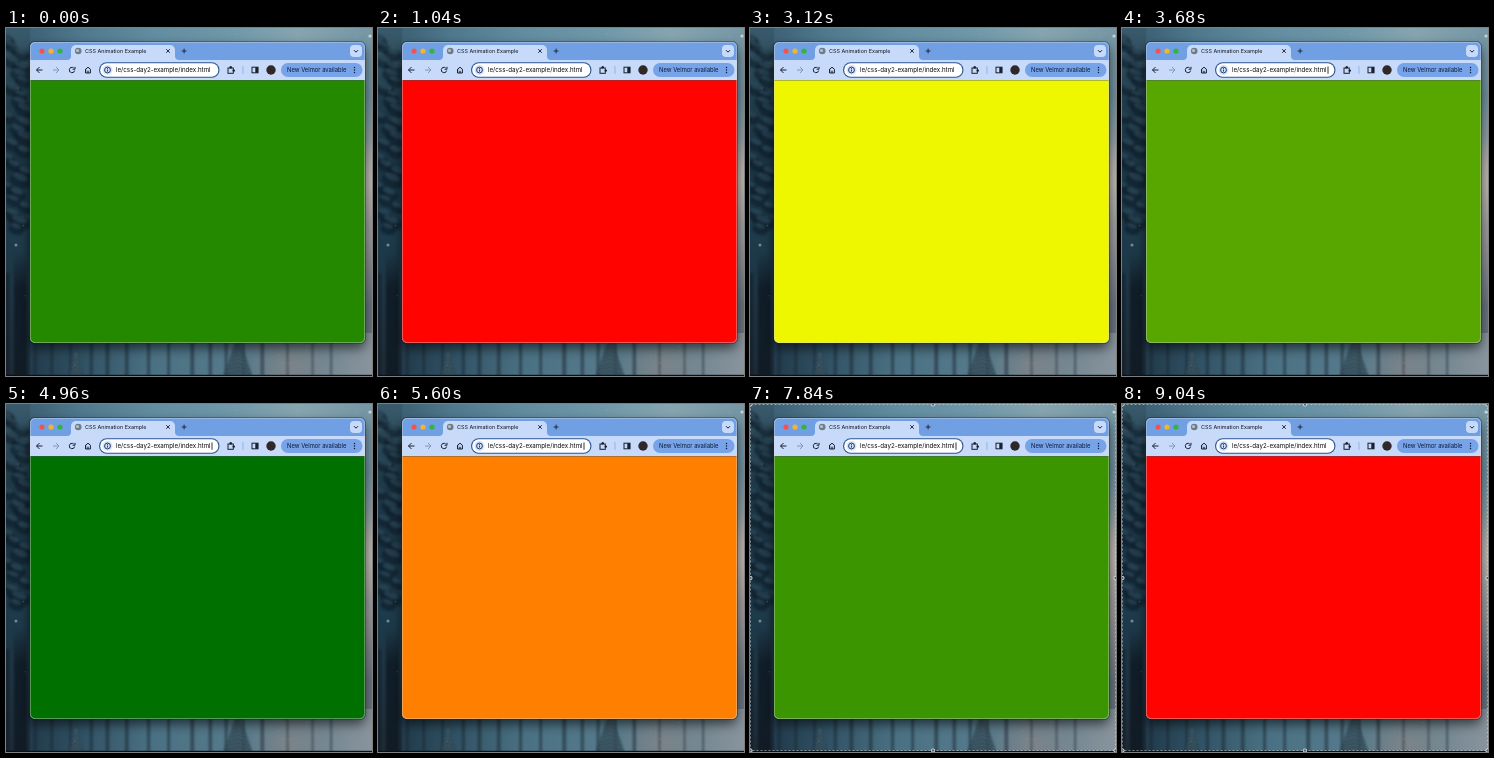
Animation of 366 by 348 pixels, one loop 9.12 s. Source, as an HTML page with a canvas:

```html
<!DOCTYPE html>
<html lang="en">
<head>
<meta charset="utf-8">
<title>CSS Animation Example</title>
<style>
html, body { margin: 0; width: 100%; height: 100%; overflow: hidden; background: #16242f; }
canvas { display: block; width: 366px; height: 348px; }
</style>
</head>
<body>
<canvas id="stage"></canvas>
<script>
const W = 366, H = 348, LOOP = 9120, STEP = 80;
const FONT = 'Inter, Roboto, sans-serif';
const INK = '#18202f', STRIP = '#719fe3', BAR = '#c7dafa';
const scale = window.devicePixelRatio || 1;

function setup(canvas) {
  canvas.width = W * scale;
  canvas.height = H * scale;
  const c = canvas.getContext('2d');
  c.scale(scale, scale);
  return c;
}

const ctx = setup(document.getElementById('stage'));
const scene = document.createElement('canvas');
let g = setup(scene);

let seed = 7;
function rand(a = 0, b = 1) {
  seed = (seed * 16807) % 2147483647;
  return a + (b - a) * seed / 2147483647;
}

function rect(x, y, w, h, color) {
  g.fillStyle = color;
  g.fillRect(x, y, w, h);
}

function round(x, y, w, h, r, color) {
  g.fillStyle = color;
  g.beginPath();
  g.roundRect(x, y, w, h, r);
  g.fill();
}

function disc(x, y, r, color) {
  g.fillStyle = color;
  g.beginPath();
  g.arc(x, y, r, 0, 7);
  g.fill();
}

function oval(x, y, rx, ry, tilt, color) {
  g.fillStyle = color;
  g.beginPath();
  g.ellipse(x, y, rx, ry, tilt, 0, 7);
  g.fill();
}

function line(points, color = INK, width = 1) {
  g.strokeStyle = color;
  g.lineWidth = width;
  g.beginPath();
  points.forEach(([x, y], i) => i ? g.lineTo(x, y) : g.moveTo(x, y));
  g.stroke();
}

function text(str, x, y, size, color) {
  g.font = `${size}px ${FONT}`;
  g.fillStyle = color;
  g.textBaseline = 'middle';
  g.fillText(str, x, y);
}

function gradient(x0, y0, x1, y1, ...colors) {
  const fill = g.createLinearGradient(x0, y0, x1, y1);
  colors.forEach((color, i) => fill.addColorStop(i / (colors.length - 1), color));
  return fill;
}

function glow(x, y, r, rgb, alpha) {
  const fill = g.createRadialGradient(x, y, 0, x, y, r);
  fill.addColorStop(0, `rgba(${rgb},${alpha})`);
  fill.addColorStop(1, `rgba(${rgb},0)`);
  rect(x - r, y - r, 2 * r, 2 * r, fill);
}

function bough(x, y, w) {
  oval(x, y + 3, w, w * 0.6, 0.3, 'rgba(13,29,40,0.6)');
  oval(x, y - 1, w * 0.7, w * 0.3, 0.35, 'rgba(66,100,120,0.4)');
}

function pine(x, top, bottom, half) {
  g.fillStyle = 'rgba(38,60,72,0.75)';
  g.beginPath();
  g.moveTo(x, top);
  g.lineTo(x + half, bottom);
  g.lineTo(x - half, bottom);
  g.fill();
  for (let y = top + 4; y < bottom; y += 4) {
    const w = half * (y - top) / (bottom - top);
    line([[x - w, y + 2], [x, y - 1], [x + w, y + 2]], 'rgba(150,172,182,0.35)', 1.2);
  }
}

function drawForest() {
  // top edge and right margin
  rect(0, 0, W, 20, gradient(0, 0, W, 0, '#35566a', '#4f788d', '#628da0', '#6e97a8', '#86a5b0', '#7596a5'));
  rect(355, 0, 11, H, gradient(0, 0, 0, H, '#7898a6', '#6d8f9e', '#a7a9a6', '#9b9a9c', '#68737f', '#6c7884'));
  glow(366, 155, 45, '215,200,188', 0.5);

  // lower edge, brighter towards the right
  rect(0, 305, W, 43, gradient(0, 0, W, 0, '#1b3040', '#2f5062', '#4a7183', '#54798a', '#67808c', '#89949d'));
  glow(282, 340, 40, '170,140,132', 0.35);
  rect(0, 0, 24, H, gradient(0, 0, 0, H, '#3a5b6d', '#203b4a', '#1b3443', '#1d3b4b', '#1e323f', '#1d2a35'));

  g.filter = `blur(${0.9 * scale}px)`;
  for (let i = 0; i < 28; i++) bough(rand(-2, 21), 10 + i * 7, rand(7, 12));
  for (let x = 28; x < W - 40; x += rand(12, 28)) {
    rect(x, 300, rand(1.5, 4), 48, 'rgba(24,34,44,0.5)');
  }
  rect(8, 225, 13, 125, gradient(0, 225, 0, 260, 'rgba(13,23,32,0)', 'rgba(13,23,32,0.75)'));
  rect(0, 245, 3, 105, 'rgba(13,23,32,0.5)');
  pine(232, 306, 350, 15);
  pine(70, 322, 350, 8);
  g.filter = 'none';

  for (let i = 0; i < 130; i++) {
    disc(rand(0, W), rand(0, H), rand(0.2, 0.75), `rgba(205,218,224,${rand(0.1, 0.4)})`);
  }
  disc(10, 217, 1.6, 'rgba(140,170,184,0.7)');
  disc(364, 8, 1.6, 'rgba(220,232,236,0.75)');
}

function drawTabs() {
  rect(24, 14, 335, 19, STRIP);
  // flared feet on both sides of the tab
  rect(61, 28, 112, 5, BAR);
  round(40, 20, 25, 12, 4, STRIP);
  round(169, 20, 25, 12, 4, STRIP);
  round(65, 17, 104, 22, 5, BAR);
  rect(24, 32, 335, 21, BAR);
  ['#f4524c', '#f3b52e', '#35b43c'].forEach((color, i) => disc(36 + i * 9, 23, 2.6, color));

  disc(72.2, 23, 3.3, '#6d7c87');
  disc(71.5, 22.4, 1.5, '#b7c3c8');
  text('CSS Animation Example', 79, 23.2, 5.45, '#0d131e');
  line([[160.2, 21.2], [163.8, 24.8]], INK, 0.9);
  line([[163.8, 21.2], [160.2, 24.8]], INK, 0.9);
  line([[175.7, 23], [180.5, 23]], INK, 0.9);
  line([[178.1, 20.6], [178.1, 25.4]], INK, 0.9);
  round(344, 17, 12, 12, 4, BAR);
  line([[348, 22.2], [350, 24.2], [352, 22.2]], INK, 1);
}

function arrow(x, dir, color) {
  line([[x - 3 * dir, 42], [x + 3 * dir, 42]], color);
  line([[x, 39], [x - 3 * dir, 42], [x, 45]], color);
}

function drawToolbar() {
  arrow(33.5, 1, INK);
  arrow(50, -1, '#8497b8');

  g.strokeStyle = INK;
  g.lineWidth = 1;
  g.beginPath();
  g.arc(66, 42, 2.7, 0.2, 5.4);
  g.stroke();
  line([[69, 38.8], [69, 41.2], [66.6, 41.2]]);
  line([[79.6, 41.2], [79.6, 45], [84.4, 45], [84.4, 41.2], [82, 39.2], [79.6, 41.2], [79.6, 45]]);
  rect(81.4, 42.8, 1.2, 2.2, INK);

  round(93, 34.2, 120.5, 15.6, 7.8, '#2c568f');
  round(94.1, 35.3, 118.3, 13.4, 6.7, '#ffffff');
  disc(101.5, 42, 5, '#d5e2fa');
  g.strokeStyle = '#1f3f70';
  g.lineWidth = 1;
  g.beginPath();
  g.arc(101.5, 42, 2.9, 0, 7);
  g.stroke();
  rect(101, 41.6, 1, 2, '#1f3f70');
  rect(101, 40, 1, 0.9, '#1f3f70');
  text('le/css-day2-example/index.html', 110, 42.2, 6.2, '#08090c');

  g.strokeStyle = INK;
  g.lineWidth = 1;
  g.strokeRect(222, 40, 5.3, 5.3);
  disc(224.7, 39.3, 1.2, INK);
  disc(227.8, 42.6, 1.2, INK);
  rect(236.5, 38, 0.9, 8, '#8eafe5');
  g.strokeStyle = INK;
  g.strokeRect(246, 39.2, 6, 5.6);
  rect(249.3, 39.2, 2.8, 5.6, INK);
  disc(265, 42, 4.7, '#302728');

  round(275, 35, 81.5, 14, 7, '#77a3e9');
  text('New Velmor available', 281, 42.2, 5.85, '#0b1a36');
  [39.6, 42, 44.4].forEach(y => disc(348.5, y, 0.75, '#0b1a36'));
}

function drawScene() {
  drawForest();
  g.save();
  g.shadowColor = 'rgba(0,0,0,0.6)';
  g.shadowBlur = 12 * scale;
  g.shadowOffsetY = 5 * scale;
  round(24, 14, 335, 301, 5, BAR);
  g.restore();
  g.save();
  g.beginPath();
  g.roundRect(24, 14, 335, 301, 5);
  g.clip();
  drawTabs();
  drawToolbar();
  g.restore();
  rect(0, 346.8, W, 1.2, '#0b1016');
}

// The standard "ease" curve: cubic-bezier(.25, .1, .25, 1)
function ease(x) {
  const bezier = (a, b, s) => 3 * a * s * (1 - s) ** 2 + 3 * b * s * s * (1 - s) + s ** 3;
  let lo = 0, hi = 1;
  for (let i = 0; i < 24; i++) {
    const mid = (lo + hi) / 2;
    if (bezier(0.25, 0.25, mid) < x) lo = mid; else hi = mid;
  }
  return bezier(0.1, 1, lo);
}

// Red to yellow to green over four seconds, then a hard cut back to red
function pageColor(t) {
  const phase = (t + 3020) % 4000;
  const k = ease((phase % 2000) / 2000);
  const tone = (v, gamma) => Math.round(255 * (v / 255) ** gamma);
  return phase < 2000
    ? `rgb(255,${tone(255 * k, 1.11)},0)`
    : `rgb(${tone(255 * (1 - k), 1.15)},${tone(255 - 127 * k, 1.2)},0)`;
}

function drawSelection() {
  g.strokeStyle = 'rgba(225,230,233,0.65)';
  g.lineWidth = 0.8;
  g.setLineDash([2, 2]);
  g.strokeRect(0.5, 0.5, W - 1, H - 2);
  g.setLineDash([]);
  for (const x of [0.5, 183, W - 0.5]) {
    for (const y of [0.5, 174, H - 1.5]) {
      if (x !== 183 || y !== 174) {
        disc(x, y, 2, '#e5e8ea');
        disc(x, y, 1.2, '#596268');
      }
    }
  }
}

function outline(inset, color) {
  g.strokeStyle = color;
  g.lineWidth = 0.7;
  g.beginPath();
  g.roundRect(24 + inset, 14 + inset, 335 - 2 * inset, 301 - 2 * inset, 5);
  g.stroke();
}

function draw(t) {
  g.drawImage(scene, 0, 0, W, H);
  round(24, 52, 335, 263, [0, 0, 5, 5], pageColor(t));
  rect(24, 52, 335, 0.8, 'rgba(70,84,100,0.5)');
  outline(-0.4, 'rgba(10,18,28,0.6)');
  outline(0.4, 'rgba(225,232,225,0.6)');
  if (t % 1000 >= 500) rect(205.6, 38.4, 0.8, 7.4, '#08090c');
  if (t >= 6400) drawSelection();
}

function tick(now) {
  draw(Math.floor((now % LOOP) / STEP) * STEP);
  requestAnimationFrame(tick);
}

drawScene();
g = ctx;
draw(0);
requestAnimationFrame(tick);
</script>
</body>
</html>
```
